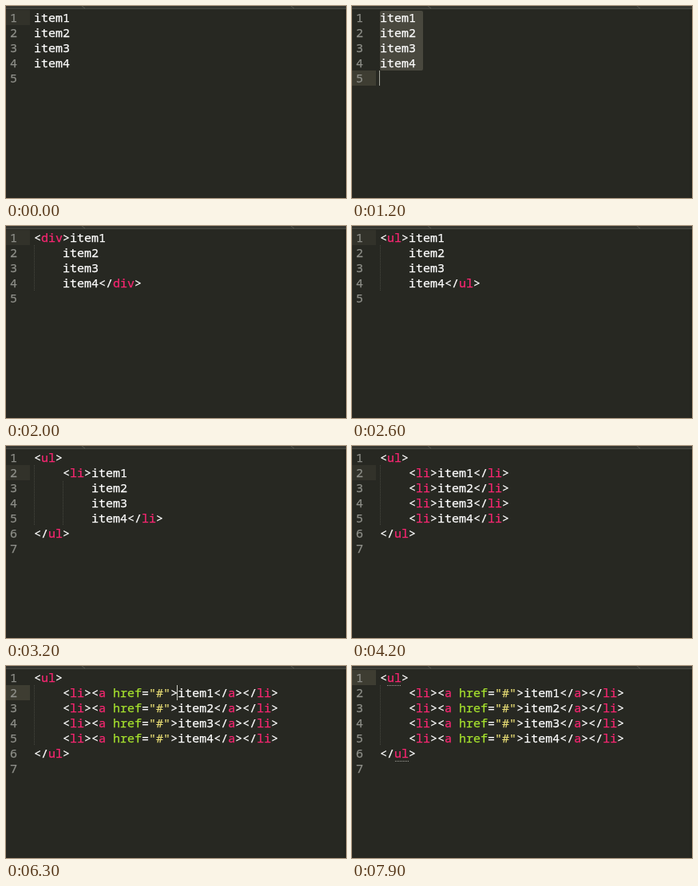
Recreate the animation shown at these times as an HTML page. Size 426x241 px, loop 8 s.

```html
<!DOCTYPE html>
<html lang="en">
<head>
<meta charset="utf-8">
<title>Wrapping lines with markup</title>
<style>
  html, body { margin: 0; width: 100%; height: 100%; overflow: hidden; background: #272822; }
  svg { display: block; width: 426px; height: 241px; }
  text { font: 15px "Noto Sans Mono", "DejaVu Sans Mono", monospace; white-space: pre; color: #fff; }
  text, tspan { fill: currentColor; stroke: currentColor; stroke-width: 0.25px; }
  .number { color: #8f908a; }
  .tag { color: #f92672; }
  .attr { color: #a6e22e; }
  .string { color: #e6db74; }
  .guide { stroke: #46473f; stroke-dasharray: 1 1; }
  .match { stroke: #a0a09a; stroke-dasharray: 1 1; }
</style>
</head>
<body>
<svg viewBox="0 0 426 241">
  <defs>
    <linearGradient id="edge">
      <stop offset="0" stop-color="#272822"/>
      <stop offset="1" stop-color="#22231e"/>
    </linearGradient>
  </defs>
  <rect width="426" height="241" fill="#272822"/>
  <rect x="422" y="4" width="4" height="237" fill="url(#edge)"/>
  <rect width="426" height="3" fill="#353631"/>
  <rect y="3" width="426" height="1" fill="#484943"/>
  <path d="M95 0l4 3M357 0l4 3" stroke="#55564f"/>
  <rect id="row" width="30" height="19" fill="#3e3d32"/>
  <rect id="selection" x="35" y="6" width="54" height="75" rx="2" fill="#49483e"/>
  <g id="page"></g>
  <rect id="caret" width="1" height="19" fill="#f8f8f0"/>
</svg>
<script>
const LOOP = 8000, TOP = 5, LEFT = 35, LINE = 19, CHAR = 9;
const DIM = 0.5;
const $ = id => document.getElementById(id);
const lineTop = line => TOP + (line - 1) * LINE;

const items = ['item1', 'item2', 'item3', 'item4'];
const indent = (lines, depth = 1) => lines.map(line => '    '.repeat(depth) + line);
const wrap = (name, lines) => {
  const out = [lines[0], ...indent(lines.slice(1))];
  out[0] = `<${name}>` + out[0];
  out[out.length - 1] += `</${name}>`;
  return out;
};
const list = lines => ['<ul>', ...indent(lines), '</ul>'];
const each = (open, close) => list(items.map(item => open + item + close));
const linked = each('<li><a href="#">', '</a></li>');

// A step keeps every value of the one before it unless it sets its own.
const changes = [
  { at: 0, lines: items, row: 1, glow: DIM, col: 0, caret: 0, selected: false, matched: false },
  { at: 800, row: 2, glow: 1, col: 5, caret: 1 },
  { at: 1200, selected: true, row: 5, col: 0, caret: 0.6 },
  { at: 1300, caret: 1 },
  { at: 1700, caret: 0.5 },
  { at: 1800, caret: 0.1 },
  { at: 2000, lines: wrap('div', items), selected: false, row: 1, glow: DIM, caret: 0 },
  { at: 2500, lines: wrap('u', items) },
  { at: 2600, lines: wrap('ul', items) },
  { at: 3100, lines: list(wrap('l', items)), row: 2 },
  { at: 3200, lines: list(wrap('li', items)) },
  { at: 4200, lines: each('<li>', '</li>') },
  { at: 4800, lines: linked },
  { at: 5400, glow: 1, col: 20, caret: 1 },
  { at: 5700, caret: 0.5 },
  { at: 5800, caret: 0 },
  { at: 6300, caret: 0.8 },
  { at: 6400, caret: 1 },
  { at: 6700, caret: 0.5 },
  { at: 6800, caret: 0 },
  { at: 7200, row: 1, col: 2, caret: 0.5 },
  { at: 7300, caret: 1 },
  { at: 7400, matched: true },
  { at: 7800, caret: 0.5 },
  { at: 7900, caret: 0 }
];
const steps = [];
for (const change of changes) steps.push({ ...steps[steps.length - 1], ...change });

const escapeText = s => s.replace(/&/g, '&amp;').replace(/</g, '&lt;').replace(/>/g, '&gt;');
const tokens = /(<\/?)(\w+)|("[^"]*")|(href)|[^<"]/g;
const span = (kind, s) => `<tspan class="${kind}">${s}</tspan>`;
const highlight = line => line.replace(tokens, (all, open, tag, string, attr) =>
  tag ? escapeText(open) + span('tag', tag)
  : string ? span('string', string)
  : attr ? span('attr', attr)
  : escapeText(all));

// Dots always fall on even pixels, wherever the line starts.
const dotted = (kind, start, d) =>
  `<path class="${kind}" stroke-dashoffset="${start % 2}" d="${d}"/>`;

function pageMarkup({ lines, matched }) {
  let out = '';
  [...lines, ''].forEach((line, i) => {
    const top = lineTop(i + 1), baseline = top + 15;
    const depth = line.search(/\S|$/) / 4;
    for (let d = 0; d < depth; d++) {
      out += dotted('guide', top, `M${LEFT + d * 4 * CHAR + 0.5} ${top}v${LINE}`);
    }
    out += `<text class="number" x="5" y="${baseline}">${i + 1}</text>`;
    out += `<text x="${LEFT + depth * 4 * CHAR}" y="${baseline}">${highlight(line.trim())}</text>`;
    const name = line.search(/ul>$/);
    if (matched && name > 0) {
      const x = LEFT + name * CHAR;
      out += dotted('match', x, `M${x} ${top + LINE + 0.5}h${2 * CHAR}`);
    }
  });
  return out;
}

function show(step) {
  $('page').innerHTML = pageMarkup(step);
  $('row').setAttribute('y', lineTop(step.row));
  $('row').setAttribute('opacity', step.glow);
  $('selection').setAttribute('opacity', +step.selected);
  $('caret').setAttribute('x', LEFT - 1 + step.col * CHAR);
  $('caret').setAttribute('y', lineTop(step.row));
  $('caret').setAttribute('opacity', step.caret);
}

let current;
function tick() {
  const time = performance.now() % LOOP;
  const step = steps.filter(s => s.at <= time).pop();
  if (step !== current) show(current = step);
  requestAnimationFrame(tick);
}
tick();
</script>
</body>
</html>
```
